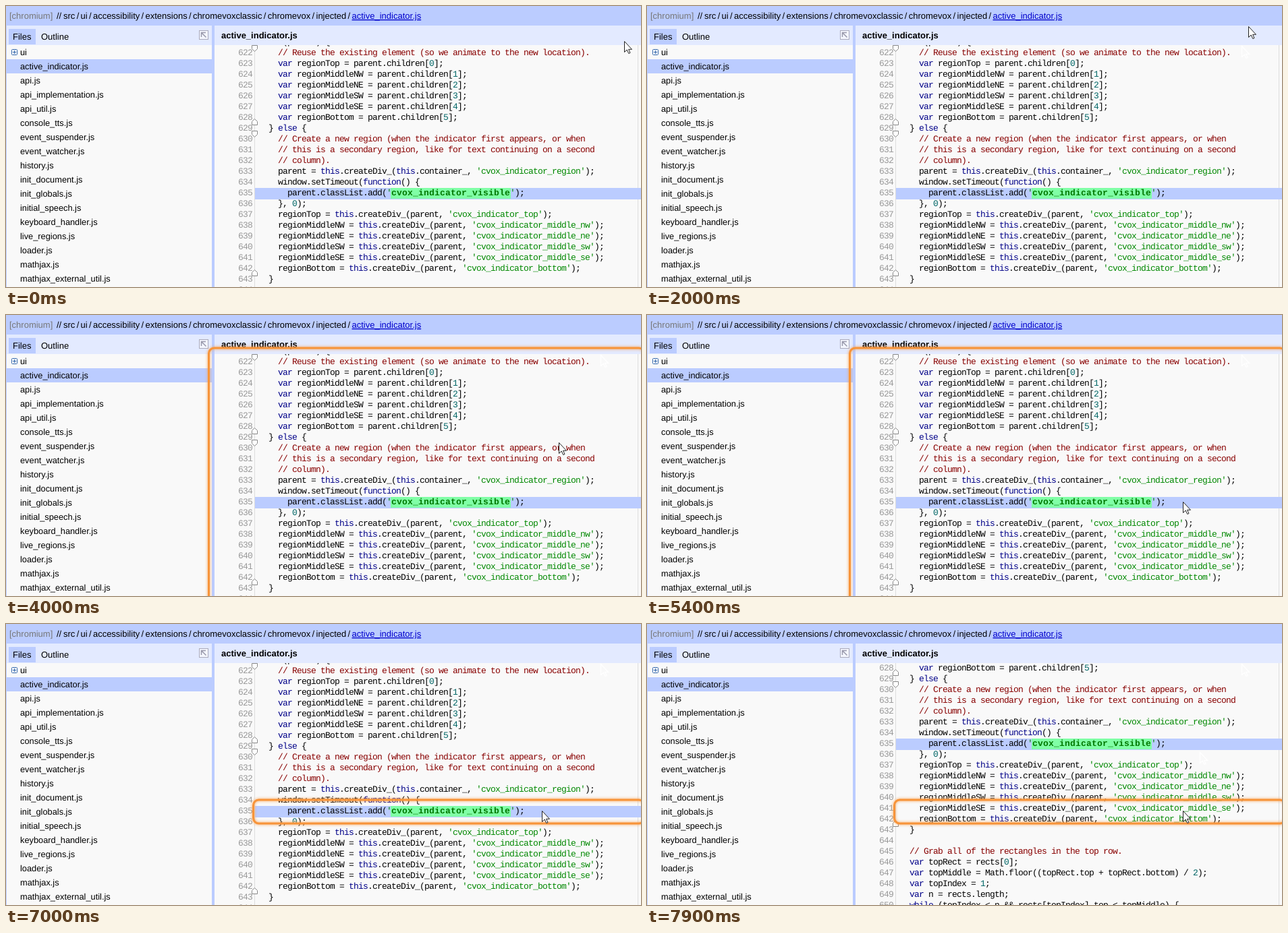
These frames come from a looping animation (941x417 px, 8000 ms). An HTML page:

```html
<!DOCTYPE html>
<html lang="en">
<head>
<meta charset="utf-8">
<title>Code viewer</title>
<style>
  html, body { margin: 0; width: 100%; height: 100%; overflow: hidden; background: #f9f9f9; }
  svg { display: block; }
  text { font: 13px "Liberation Sans", Arial, sans-serif; white-space: pre; text-rendering: geometricPrecision; }
  #title { font-weight: bold; }
  #files text { font-size: 12.8px; }
  #code text { font: 13px "Liberation Mono", monospace; letter-spacing: -.8px; }
  #code .mark { font-weight: bold; letter-spacing: .2px; fill: #070; }
  #code .num { fill: #999; }
  .com { fill: #800; }
  .str { fill: #080; }
  .key { fill: #008; }
  .lit { fill: #066; }
  #ring { filter: drop-shadow(0 0 2px #f7a050); }
</style>
</head>
<body>
<svg width="941" height="417" viewBox="0 0 941 417">
  <defs>
    <clipPath id="view"><rect x="309" y="58" width="632" height="359"/></clipPath>
    <path id="arrow" d="M.5 .5V16.5L4.2 13L6.8 18.5L9 17.5L6.6 12.3H11.5Z"/>
  </defs>
  <rect width="941" height="417" fill="#f9f9f9"/>
  <rect width="941" height="29" fill="#bcf"/>
  <path d="M0 29H305V58H0ZM309 29H941V58H309Z" fill="#e3eaff"/>
  <path d="M305 29h4V417h-4ZM4 34H44V57H4ZM0 79H305V100H0ZM0 29H1V417H0Z" fill="#bcf"/>
  <text x="5" y="19" fill="#777">[chromium]</text>
  <text x="75" y="19">//</text>
  <text id="crumbs" x="85" y="19"></text>
  <text x="10" y="50">Files</text>
  <text x="52" y="50">Outline</text>
  <g fill="none" stroke="#aab">
    <rect x="286.500" y="36.500" width="13" height="13" fill="#f4f6ff"/>
    <path d="M296.500 46.500L290 40M289.500 46V39.500H296" stroke="#99a" stroke-width="1.500"/>
  </g>
  <g fill="none" stroke="#36a">
    <rect x="8.500" y="64.500" width="8" height="8" rx="1" fill="#fff"/>
    <path d="M10 68.500H15M12.500 66V71"/>
  </g>
  <g id="files"></g>
  <text id="title" x="319" y="48">active_indicator.js</text>
  <path d="M936.500 58V417" stroke="#ddd"/>
  <g fill="none" stroke="#fff" stroke-width="1.300">
    <use id="ghost1" href="#arrow" x="881" y="59"/>
    <use id="ghost2" href="#arrow" x="819" y="190"/>
  </g>
  <g clip-path="url(#view)"><g id="code"></g></g>
  <rect id="ring" rx="8" fill="none" stroke="#f7943a" stroke-width="3"/>
  <use id="cursor" href="#arrow" fill="#fff" stroke="#222"/>
</svg>
<script>
const $ = id => document.getElementById(id);
const esc = s => s.replace(/&/g, '&amp;').replace(/</g, '&lt;');
const label = (x, y, s, type = '') => `<text x="${x}" y="${y}" class="${type}">${esc(s)}</text>`;

const folders = ['src', 'ui', 'accessibility', 'extensions', 'chromevoxclassic', 'chromevox', 'injected'];
$('crumbs').innerHTML = folders.map(s => `<tspan dx="2.3">${s}</tspan><tspan dx="2.3">/</tspan>`).join('')
  .replace('dx="2.3"', 'dx="0"')
  + '<tspan dx="2.3" fill="#00c" text-decoration="underline">active_indicator.js</tspan>';

const files = ['ui', ...`active_indicator api api_implementation api_util console_tts event_suspender event_watcher
  history init_document init_globals initial_speech keyboard_handler live_regions loader mathjax
  mathjax_external_util`.split(/\s+/).map(s => s + '.js')];
$('files').innerHTML = files.map((s, i) => label(21, 73 + i * 21, s)).join('');

const FIRST = 621, PITCH = 16, CHAR = 7, LEFT = 375, MARK = 'cvox_indicator_visible';
const source = `  if (parent) {
    // Reuse the existing element (so we animate to the new location).
    var regionTop = parent.children[0];
    var regionMiddleNW = parent.children[1];
    var regionMiddleNE = parent.children[2];
    var regionMiddleSW = parent.children[3];
    var regionMiddleSE = parent.children[4];
    var regionBottom = parent.children[5];
  } else {
    // Create a new region (when the indicator first appears, or when
    // this is a secondary region, like for text continuing on a second
    // column).
    parent = this.createDiv_(this.container_, 'cvox_indicator_region');
    window.setTimeout(function() {
      parent.classList.add('${MARK}');
    }, 0);
    regionTop = this.createDiv_(parent, 'cvox_indicator_top');
    regionMiddleNW = this.createDiv_(parent, 'cvox_indicator_middle_nw');
    regionMiddleNE = this.createDiv_(parent, 'cvox_indicator_middle_ne');
    regionMiddleSW = this.createDiv_(parent, 'cvox_indicator_middle_sw');
    regionMiddleSE = this.createDiv_(parent, 'cvox_indicator_middle_se');
    regionBottom = this.createDiv_(parent, 'cvox_indicator_bottom');
  }

  // Grab all of the rectangles in the top row.
  var topRect = rects[0];
  var topMiddle = Math.floor((topRect.top + topRect.bottom) / 2);
  var topIndex = 1;
  var n = rects.length;
  while (topIndex < n && rects[topIndex].top < topMiddle) {`.split('\n');

const token = new RegExp(
  `(//.*|${MARK}|'(?!${MARK})[^']*'|'|\\b(?:var|else|if|this|function|while)\\b|\\b\\d+\\b)`);
const kind = s => s == MARK ? 'mark' : s[0] == '/' ? 'com' : s[0] == "'" ? 'str' : /\d/.test(s[0]) ? 'lit' : 'key';

function codeLine(line, i) {
  const y = 57 + i * PITCH;
  let x = LEFT, out = label(344, y, String(FIRST + i), 'num');
  line.split(token).forEach((s, j) => {
    const type = j % 2 ? kind(s) : '';
    if (s.trim()) out += label(x, y, s, type);
    x += s.length * (type == 'mark' ? CHAR + 1 : CHAR);
  });
  return out;
}
const fold = (y, dir) =>
  `<path d="M364.500 ${y + 4 * dir}h8v${-5 * dir}l-4 ${-4 * dir}l-4 ${4 * dir}Z" fill="#fff" stroke="#888"/>`;
$('code').innerHTML = '<path d="M368.500 0V600" stroke="#ddd"/>'
  + '<path d="M369 270H941V287H369Z" fill="#bcf"/><path d="M570 270H748V286H570Z" fill="#80ffa6"/>'
  + source.map(codeLine).join('')
  + fold(62.5, -1) + fold(172.5, 1) + fold(189.5, -1) + fold(396.5, 1);

// Each row: start time, then the values held from then on
const cursorPath = [[0, 916, 52], [100, 906, 53], [200, 891, 56], [300, -50, 0], [2000, 891, 30],
  [2200, 880, 25], [2300, 867, 22], [2400, 861, 21], [3500, 859, 21], [3800, 852, 60], [3900, 835, 135],
  [4000, 819, 189], [4100, 815, 197], [4200, 813, 200], [4300, 812, 202], [4700, 797, 214], [4800, 774, 234],
  [4900, 758, 255], [5000, 752, 273], [5100, 757, 284], [5200, 770, 286], [5300, 785, 281], [5400, 794, 277]];
const scrolling = [[0, 0], [7700, 24], [7800, 70], [7900, 100]];
const growth = [[0, 0], [3800, .59], [3900, .91], [4000, 1], [6800, .41], [6900, .09], [7000, 0]];
const at = (rows, t) => rows.filter(r => r[0] <= t).pop().slice(1);
const set = (id, attrs) => { for (const k in attrs) $(id).setAttribute(k, attrs[k]); };
const show = (id, on) => set(id, { visibility: on ? 'visible' : 'hidden' });

function draw(now) {
  const t = now % 8000;
  const [x, y] = at(cursorPath, t), [k] = at(growth, t);
  set('cursor', { x, y });
  set('code', { transform: `translate(0 ${-at(scrolling, t)[0]})` });
  const left = 366.5 - 66 * k, top = 261 - 212 * k, bottom = 296 + 405 * k;
  set('ring', { x: left, y: top, width: 946 - left, height: bottom - top });
  show('ring', t >= 2700);
  show('ghost1', t >= 300);
  show('ghost2', t >= 4100);
  requestAnimationFrame(draw);
}
draw(performance.now());
</script>
</body>
</html>
```
